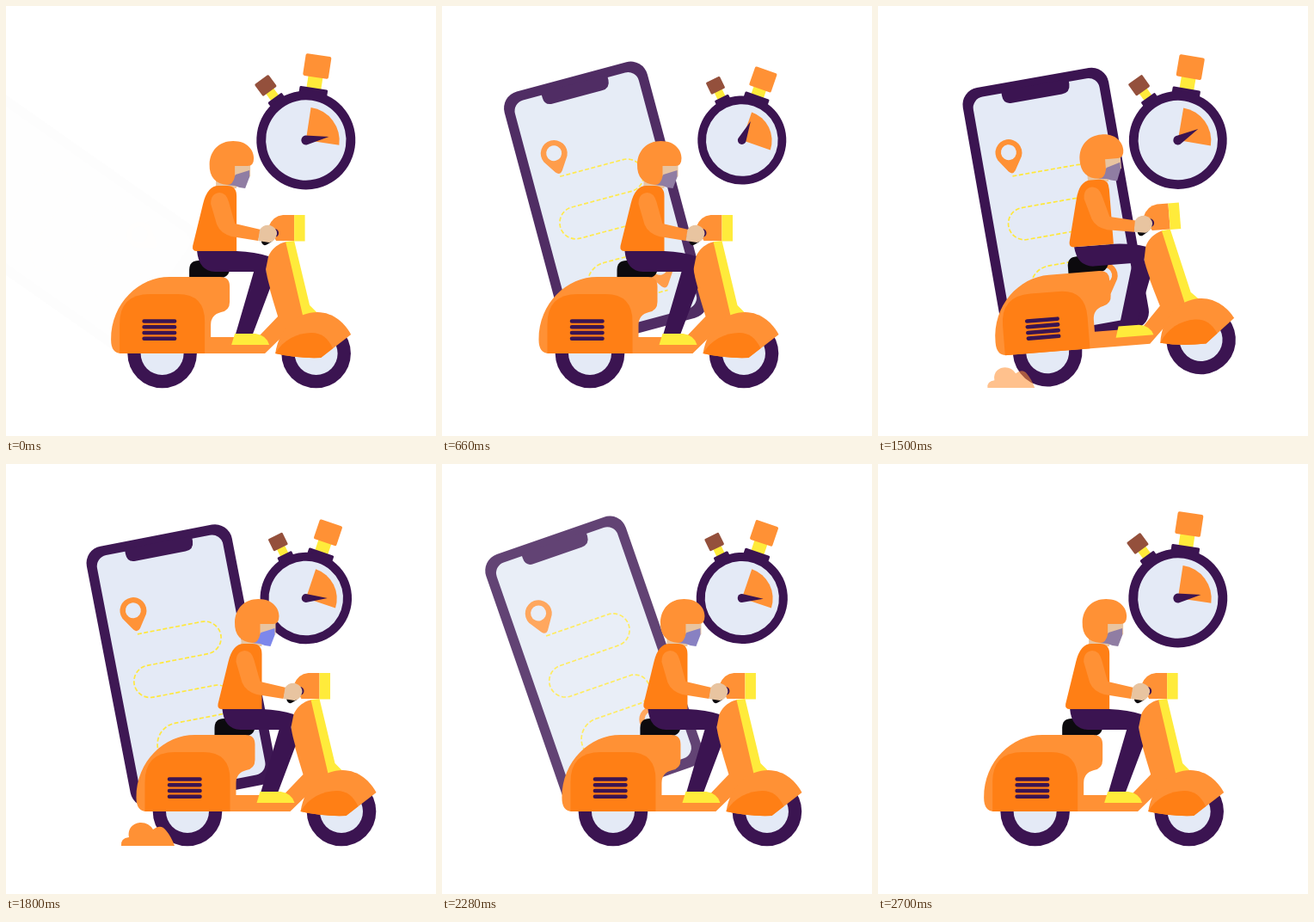
Animation, 500 px wide and 500 px high, one loop 2.73 s. Source, as an HTML page:

```html
<!DOCTYPE html>
<html lang="en">
<head>
<meta charset="utf-8">
<title>Scooter delivery</title>
<style>
  html, body { margin: 0; width: 100%; height: 100%; overflow: hidden; background: #fff; }
  svg { display: block; width: 100%; height: 100%; }
  .dark { fill: #3b1451; }
  .light { fill: #ff9135; }
  .deep { fill: #ff7f15; }
  .yellow { fill: #ffeb3b; }
  .pale { fill: #e4eaf6; }
  .skin { fill: #e8c4a0; }
  .brown { fill: #94503c; }
</style>
</head>
<body>
<svg viewBox="0 0 500 500">
  <defs>
    <path id="pin" class="light" fill-rule="evenodd"
      d="M-14 7A15.5 15.5 0 1 1 14 7L4 22Q0 27-4 22ZM-9 0A9 9 0 1 0 9 0A9 9 0 1 0-9 0Z"/>
  </defs>

  <!-- Phone, hinged at its lower left -->
  <g id="phone">
    <rect class="dark" y="-326.5" width="172" height="308" rx="20"/>
    <rect class="pale" x="11.5" y="-315" width="149" height="284" rx="13"/>
    <path class="dark" d="M47-318H126.500V-312Q126-302 116-302H57Q47-302 47-312Z"/>
    <path fill="none" stroke="#ffe83b" stroke-width="1.7" stroke-dasharray="5 2.500"
      d="M43-218H119A19 19 0 0 1 119-180H47A18.700 18.700 0 0 0 47-142.500H120A17.200 17.200 0 0 1 120-108H66A25 25 0 0 0 66-58H130"/>
    <use href="#pin" x="43.300" y="-246"/>
    <use href="#pin" x="128" y="-86"/>
  </g>

  <g id="watch">
    <g id="crown">
      <rect class="yellow" x="-8.500" y="-76" width="17" height="18"/>
      <rect class="light" x="-15" y="-100" width="30" height="26" rx="2"/>
    </g>
    <rect class="dark" x="-16.500" y="-61.500" width="33" height="10" rx="1.500"/>
    <g transform="rotate(-45)">
      <rect class="yellow" x="-5.500" y="-72" width="11" height="14"/>
      <rect class="brown" x="-10" y="-87.500" width="20" height="17" rx="1.500"/>
      <rect class="dark" x="-10" y="-61.500" width="20" height="10" rx="1.500"/>
    </g>
    <circle class="dark" r="57.500"/>
    <circle class="pale" r="46.700"/>
    <path class="light" d="M0 0V-38.500A39 39 0 0 1 39 0Z"/>
    <path id="hand" class="dark" d="M-5.500 0L0-27L5.500 0A5.500 5.500 0 0 1-5.500 0Z"/>
  </g>

  <g id="scooter">
    <circle class="dark" cx="181.500" cy="404" r="40.300"/>
    <circle class="pale" cx="181.500" cy="404" r="25"/>
    <circle class="dark" cx="360.500" cy="404" r="40.300"/>
    <circle class="pale" cx="360.500" cy="404" r="25"/>

    <path fill="#0c0a0e" d="M213 316V307Q213 296 224 296H252L260 308Q257 316 250 316Z"/>
    <path class="light" d="M122 388C122 345 155 315 190 315H249Q260 315 260 326V344Q260 354 250 356Q238 359 238 371V385H293L316 361C308 334 302 316 302 306C302 289 312 277 326 274L346 360L301 404H134Q122 404 122 388Z"/>
    <path class="deep" d="M132 404V370Q132 335 167 335H200Q231 335 231 367V404Z"/>
    <path stroke="#3b1451" stroke-width="4.600" stroke-linecap="round"
      d="M160.500 366.500H196M160.500 373.200H196M160.500 380H196M160.500 386.700H196"/>

    <path class="dark" d="M222 285H268Q290 286 305 291L302 306Q303 314 307 328L287 381H267L288 309H243Q224 308 222 285Z"/>
    <path class="yellow" d="M266 381H290Q303 383 306 394H262Z"/>

    <path class="yellow" d="M325 274L335 273L353 348L362 357L345 360Z"/>
    <path class="light" d="M313 404C318 372 340 356 362 356C381 356 395 370 401 382L366 409Q338 410 313 404Z"/>
    <path class="deep" d="M313 404C322 388 339 380 355 380C367 380 374 386 380 398L366 409Q338 410 313 404Z"/>

    <path class="light" d="M335 243H322Q310 244 305 257L314 273H335Z"/>
    <rect class="yellow" x="335" y="243" width="12.500" height="30.500"/>
    <path stroke="#0c0a0e" stroke-width="8" stroke-linecap="round" d="M301 274L306 271"/>
    <circle class="dark" cx="312" cy="264" r="5"/>

    <path class="skin" d="M244 200H268V212H244ZM262 183H284V198L270 208H262Z"/>
    <path id="mask" d="M257 208L267 196L283 191V199L278 212Q272 212 266 209Z"/>
    <path class="light" d="M264 157C281 157 288 168 288 177Q288 186 281 186H266V198Q264 208 257 208C244 207 236 199 236.500 184C237 168 248 157 264 157Z"/>
    <path class="deep" d="M222 285Q216 285 217 279L229 230Q234 209 247 209H257Q268 209 268 221V285Z"/>
    <path class="light" d="M238 230Q238 218 248 217Q256 217 259 228L266 253L296 260L293 273L262 268Q249 264 245 254Z"/>
    <path class="skin" d="M295 260Q299 254 307 255Q315 258 315 265Q313 274 306 275L293 273Z"/>
  </g>

  <path id="dust" class="light"
    d="M-62 0Q-63-9-53-10C-55-22-46-27-39-27Q-30-27-25-19Q-16-26-10-18Q-4-11 0 0Z"/>
</svg>
<script>
  const LOOP = 2730;
  const part = id => document.getElementById(id);
  const [phone, watch, crown, hand, scooter, mask, dust] =
    ['phone', 'watch', 'crown', 'hand', 'scooter', 'mask', 'dust'].map(part);
  const place = (el, transform) => el.setAttribute('transform', transform);
  const ramp = (t, from, to) => Math.min(1, Math.max(0, (t - from) / (to - from)));
  const ease = (t, from, to) => (1 - Math.cos(Math.PI * ramp(t, from, to))) / 2;

  function drawPhone(t) {
    const entering = (1 - ramp(t, 0, 1130)) ** 2.5;
    const u = ramp(t, 1620, 2700);
    const away = Math.max(entering, 0.3 * u ** 1.5 + 0.7 * u ** 5);
    place(phone, `translate(152 420) rotate(${-10 - 45 * away})`);
    phone.setAttribute('opacity', 1 - away);
  }

  function drawWatch(t) {
    const phase = t / 1365 % 1;
    const wave = Math.cos(2 * Math.PI * phase);
    const tilt = 8.6 + 10.6 * (ease(phase, 0.03, 0.37) - ease(phase, 0.63, 0.97));
    const press = 12 * Math.max(0, (1 - wave) / 2 - 0.7);
    place(watch, `translate(348.800 156) rotate(${tilt}) scale(${(54.5 + 3 * wave) / 57.5})`);
    place(crown, `translate(0 ${press})`);
    place(hand, `rotate(${73 - 68 * (ease(t, 0, 700) - ease(t, 850, 1900))})`);
  }

  function drawScooter(t) {
    const forward = ease(t, 1000, 1850);
    const back = 1 - ease(t < 850 ? t + LOOP : t, 1690, 3240);
    const shift = -9.5 + 39.5 * (t < 850 ? back : Math.min(forward, back));
    const lift = 5.5 * Math.sin(Math.PI * ramp(t, 950, 1750));
    place(scooter, `translate(${shift} 0) rotate(${-lift} 159 404)`);

    const blue = ease(t, 1500, 1780) - ramp(t, 1800, 2650);
    const mix = (a, b) => Math.round(a + (b - a) * blue);
    mask.setAttribute('fill', `rgb(${mix(144, 125)},${mix(125, 135)},${mix(163, 235)})`);

    const size = ramp(t, 950, 1700) ** 0.4;
    const alpha = t < 980 ? 0 : 0.3 + 0.7 * ramp(t, 1020, 1800) ** 2;
    place(dust, `translate(${166.5 + shift} 444) scale(${size})`);
    dust.setAttribute('opacity', alpha * (1 - ramp(t, 1900, 2150)));
  }

  function frame(now) {
    const t = now % LOOP;
    drawPhone(t);
    drawWatch(t);
    drawScooter(t);
    requestAnimationFrame(frame);
  }
  frame(performance.now());
</script>
</body>
</html>
```
